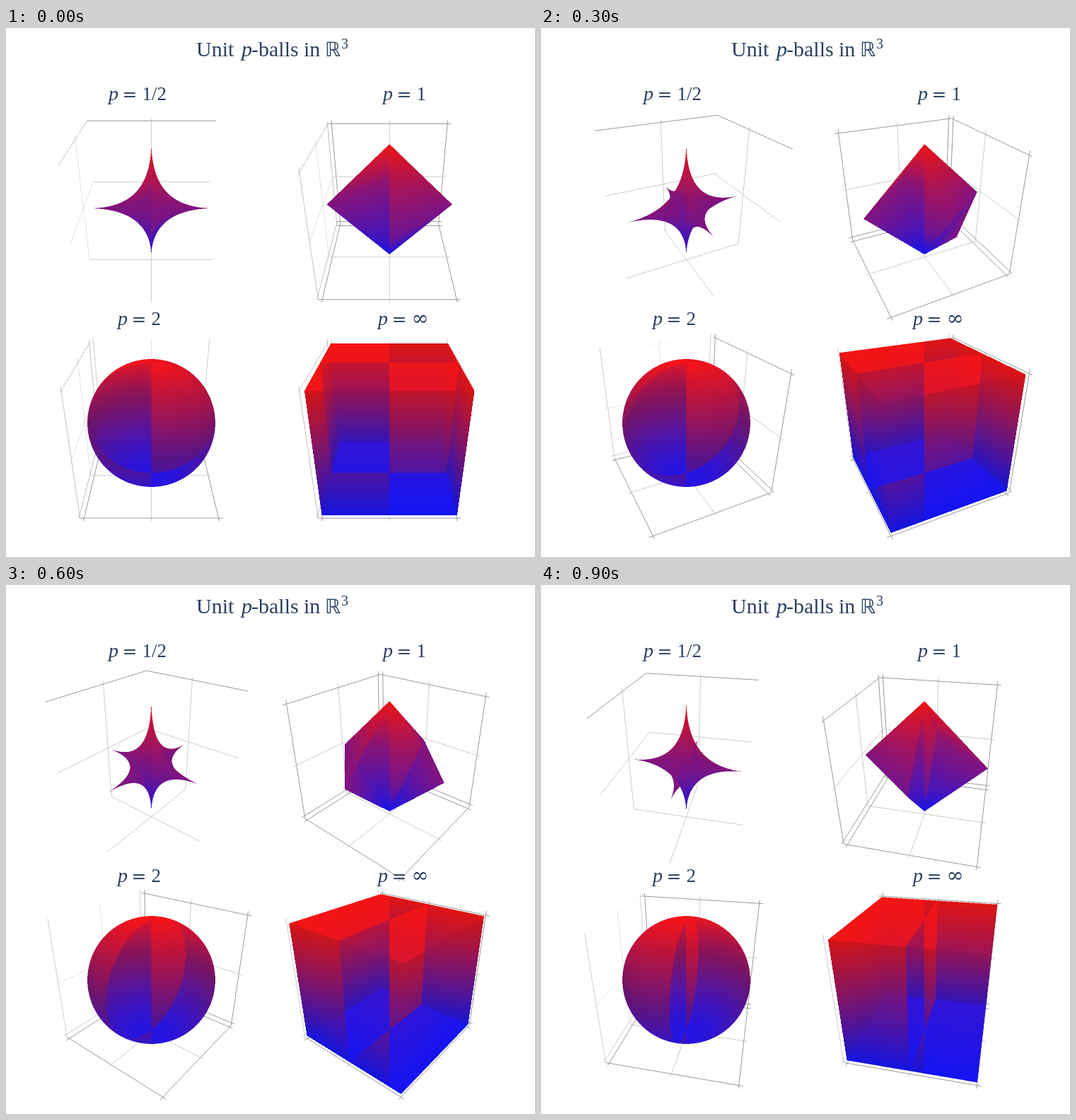
Animation of 748x748 px, one loop 1050 ms. Source, as an HTML page with a canvas:

```html
<!DOCTYPE html>
<html lang="en">
<head>
<meta charset="utf-8">
<title>Unit p-balls</title>
<style>
  html, body { margin: 0; width: 100%; height: 100%; overflow: hidden; background: #fff; }
  canvas { display: block; }
</style>
</head>
<body>
<canvas id="stage" width="748" height="748"></canvas>
<script>
const SIZE = 748, STEPS = 7, HOLD = 150, SCALE = 2;
const FOCAL = 460.8, DISTANCE = 5.194;
const TILT = Math.atan(0.5657), TC = Math.cos(TILT), TS = Math.sin(TILT);

const evenGrid = { range: [1.06, 1.06, 1.06], ticks: [[-1, 0, 1], [-1, 0, 1], [-1, 0, 1]] };
const starGrid = { range: [1.09, 0.98, 1.12], ticks: [[0], [0], [-0.0713, 1.0726]] };
const cubePlanes = [[1, 0, 0], [0, 1, 0], [0, 0, 1]];
const octaPlanes = [[1, 1, 1], [1, -1, 1], [-1, 1, 1], [-1, -1, 1]];

// hit(o, d) gives the near and far ray parameters; level(z) is how level the surface is.
const panels = [
  { cx: 205.5, cy: 249.5, reach: 95, grid: starGrid, scale: [1.01, 0.93, 1.115], lift: -0.0713,
    hit: hitStar, level: () => 0.5 },
  { cx: 542.2, cy: 249.5, reach: 95, grid: evenGrid,
    hit: (o, d) => hitPlanes(o, d, octaPlanes), level: () => 0.577 },
  { cx: 205.5, cy: 558.5, reach: 95, grid: evenGrid, faintBack: true,
    hit: hitSphere, level: z => 1.5 * Math.abs(z) - 0.5 },
  { cx: 542.2, cy: 558.5, reach: 165, grid: evenGrid, faintBack: true,
    hit: (o, d) => hitPlanes(o, d, cubePlanes), level: z => Math.abs(z) > 0.9999 ? 1 : 0 },
];

const dot = (a, b) => a[0] * b[0] + a[1] * b[1] + a[2] * b[2];

function hitPlanes(o, d, planes) {
  let near = -Infinity, far = Infinity;
  for (const n of planes) {
    const a = dot(n, o), b = dot(n, d) || 1e-9;
    const t1 = (-1 - a) / b, t2 = (1 - a) / b;
    near = Math.max(near, Math.min(t1, t2));
    far = Math.min(far, Math.max(t1, t2));
    if (near >= far) return null;
  }
  return [near, far];
}

function hitSphere(o, d) {
  const a = dot(d, d), b = dot(o, d), q = b * b - a * (dot(o, o) - 1);
  if (q <= 0) return null;
  const r = Math.sqrt(q);
  return [(-b - r) / a, (-b + r) / a];
}

// Along a ray the field is concave between coordinate planes, so its minima lie on those planes.
function hitStar(o, d) {
  const field = t => {
    const z = o[2] + d[2] * t;
    return Math.sqrt(Math.abs(o[0] + d[0] * t)) + Math.sqrt(Math.abs(o[1] + d[1] * t)) +
      Math.sqrt(z < 0 ? -z * 1.133 : z) - 1;
  };
  const cuts = o.map((v, i) => -v / (d[i] || 1e-9)).sort((a, b) => a - b);
  const first = cuts.findIndex(t => field(t) <= 0);
  if (first < 0) return null;
  const last = cuts.findLastIndex(t => field(t) <= 0);
  const reach = 4 / Math.sqrt(dot(d, d));
  const edge = (inside, outside) => {
    for (let i = 0; i < 20; i++) {
      const middle = (inside + outside) / 2;
      if (field(middle) <= 0) inside = middle; else outside = middle;
    }
    return inside;
  };
  return [
    edge(cuts[first], cuts[first - 1] ?? cuts[first] - reach),
    edge(cuts[last], cuts[last + 1] ?? cuts[last] + reach),
  ];
}

function project(panel, angle, [x, y, z]) {
  const c = Math.cos(angle), s = Math.sin(angle);
  const side = x * c + y * s, front = y * c - x * s;
  const k = FOCAL / (DISTANCE - front * TC - z * TS);
  return [panel.cx + side * k, panel.cy - (z * TC - front * TS) * k];
}

function drawGrid(g, panel, angle) {
  const { range, ticks } = panel.grid;
  const sides = [angle ? 1 : -1, -1, -1];
  g.lineWidth = 1;
  for (let wall = 0; wall < 3; wall++) {
    for (let across = 0; across < 3; across++) {
      if (across === wall) continue;
      const along = 3 - wall - across;
      for (const tick of ticks[across]) {
        const from = [], to = [];
        from[wall] = to[wall] = sides[wall] * range[wall];
        from[across] = to[across] = tick;
        from[along] = -range[along];
        to[along] = range[along];
        g.globalAlpha = wall === 0 && !angle ? 0.6 : 1;
        if (panel.faintBack && wall === 1) g.globalAlpha = across === 2 && tick === 1 ? 0.08 : 0.5;
        g.strokeStyle = Math.abs(tick) > 0.5 ? '#999' : '#ccc';
        g.beginPath();
        g.moveTo(...project(panel, angle, from));
        g.lineTo(...project(panel, angle, to));
        g.stroke();
      }
    }
  }
  g.globalAlpha = 1;
}

function drawBall(g, panel, angle) {
  const { reach, hit, level, scale = [1, 1, 1], lift = 0 } = panel;
  const c = Math.cos(angle), s = Math.sin(angle), n = reach * 2 * SCALE;
  const layer = new OffscreenCanvas(n, n), lg = layer.getContext('2d');
  const image = lg.createImageData(n, n), px = image.data;
  const toBall = (x, y, z) =>
    [(x * c - y * s) / scale[0], (x * s + y * c) / scale[1], z / scale[2]];
  const origin = toBall(0, DISTANCE * TC, DISTANCE * TS - lift);

  for (let row = 0, k = 0; row < n; row++) {
    const v = reach - (row + 0.5) / SCALE;
    for (let col = 0; col < n; col++, k += 4) {
      const u = (col + 0.5) / SCALE - reach;
      const dir = toBall(u, -FOCAL * TC - v * TS, -FOCAL * TS + v * TC);
      const span = hit(origin, dir);
      if (!span) continue;
      const [near, far] = span.map(t => {
        const z = origin[2] + dir[2] * t;
        const heat = Math.min(1, Math.max(0, (z + 1) / 2));
        const light = 255 * (0.82 + 0.18 * level(z));
        return { ahead: origin[1] + dir[1] * t > 0, red: heat * light, blue: (1 - heat) * light };
      });
      // The two halves of the view stack their layers in opposite order.
      const nearWins = near.ahead === far.ahead ? u < 0 : near.ahead === u > 0;
      const [top, under] = nearWins ? [near, far] : [far, near];
      px[k] = 0.7 * top.red + 0.22 * under.red + 20;
      px[k + 1] = 20;
      px[k + 2] = 0.7 * top.blue + 0.22 * under.blue + 20;
      px[k + 3] = 255;
    }
  }
  lg.putImageData(image, 0, 0);
  g.drawImage(layer, panel.cx - reach, panel.cy - reach, reach * 2, reach * 2);
}

const SERIF = '"Liberation Serif", serif', SYMBOL = '"DejaVu Serif", "DejaVu Sans", serif';

function write(g, text, x, y, size, family = SERIF, style = '') {
  g.font = `${style} ${size}px ${family}`;
  g.fillText(text, x, y);
}

function drawText(g) {
  g.fillStyle = '#2a3f5f';
  write(g, 'Unit', 269, 40, 30);
  write(g, 'p', 333, 40, 30, SERIF, 'italic');
  write(g, '-balls', 347, 40, 30);
  write(g, 'in', 421, 40, 30);
  write(g, 'ℝ', 451, 40, 28, '"DejaVu Sans", sans-serif');
  write(g, '3', 474, 29, 20);
  const label = (value, x, y, family, size = 27) => {
    write(g, 'p', x + 1, y, 28, SERIF, 'italic');
    write(g, '=', x + 20.5, y, 25, SYMBOL);
    write(g, value, x + 48.5, y, size, family);
  };
  label('1/2', 144, 102);
  label('1', 532, 102);
  label('2', 157, 420);
  label('∞', 525, 420, SYMBOL, 29);
}

function render(step) {
  const canvas = new OffscreenCanvas(SIZE, SIZE), g = canvas.getContext('2d');
  const angle = step * Math.PI / 2 / STEPS;
  g.fillStyle = '#fff';
  g.fillRect(0, 0, SIZE, SIZE);
  for (const panel of panels) {
    drawGrid(g, panel, angle);
    drawBall(g, panel, angle);
  }
  drawText(g);
  return canvas;
}

const stage = document.getElementById('stage').getContext('2d');
const views = [];

function tick() {
  const step = Math.floor(performance.now() / HOLD) % STEPS;
  stage.drawImage(views[step] ??= render(step), 0, 0);
  const next = (step + 1) % STEPS;
  views[next] ??= render(next);
  requestAnimationFrame(tick);
}
tick();
</script>
</body>
</html>
```
